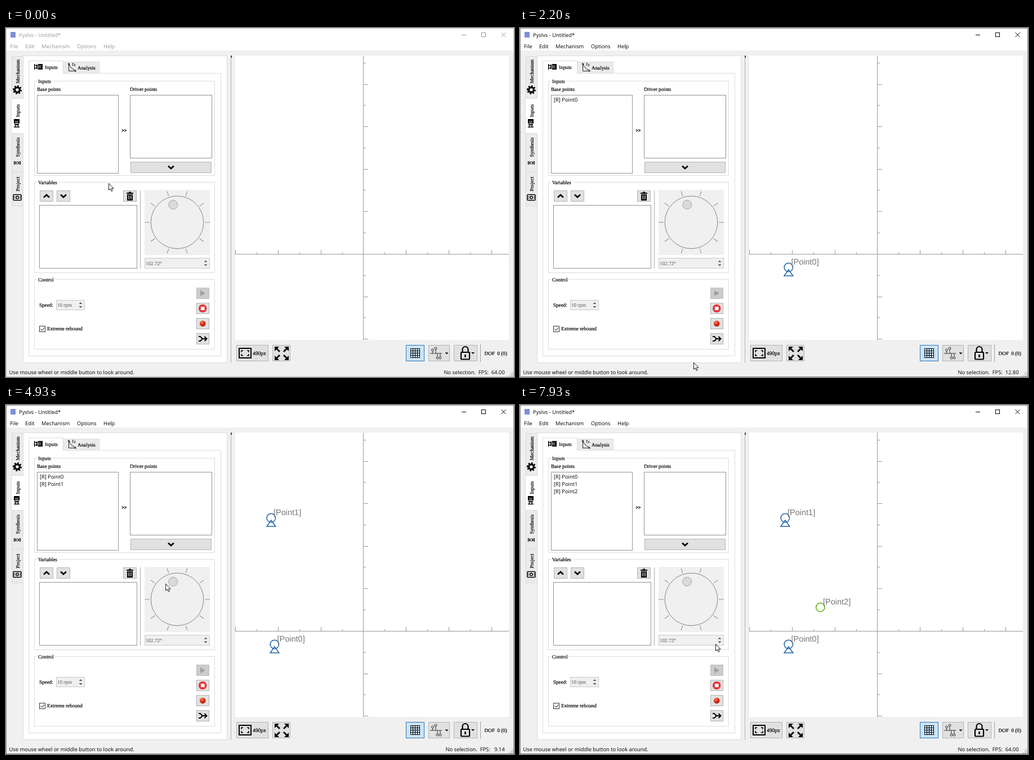
Write an HTML page that moves like this. It is 902 px wide and 621 px high and loops after 8 s.

```html
<!DOCTYPE html>
<html lang="en">
<head>
<meta charset="utf-8">
<title>Mechanism editor</title>
<style>
  html, body { margin: 0; width: 100%; height: 100%; overflow: hidden; background: #f0f0f0; }
  svg { display: block; width: 100vw; height: 100vh; }
  text { font: 9.35px "Open Sans", "Noto Sans", sans-serif; fill: #000; white-space: pre; text-rendering: geometricPrecision; }
  .serif text { font: 9.1px "Liberation Serif", serif; stroke: #000; stroke-width: .2; }
  .label text { font: 14.5px "Liberation Sans", Arial, sans-serif; fill: #777; }
  .dim text { fill: #777; stroke: #777; }
  .crisp { shape-rendering: crispEdges; }
  .pane { fill: #fff; stroke: #dcdcdc; }
  .tab { fill: #ebebeb; stroke: #d9d9d9; }
  .list { fill: #fff; stroke: #8f949b; }
  .button { fill: #e1e1e1; stroke: #b4b4b4; }
  .spin { fill: #f0f0f0; stroke: #c8c8c8; }
  .line { fill: none; stroke: #000; }
  .bold { fill: none; stroke: #111; stroke-width: 3; }
  .axis { fill: none; stroke: #999; }

  /* One loop is 8 s, so 1% is 80 ms. */
  .chrome, .border, .tip, .menu, .hover, .p0, .p1, .p2 { animation: 8s step-end infinite; }
  .chrome { animation-name: activate; color: #999; }
  .chrome text { fill: currentColor; }
  .border { animation-name: frame; fill: none; stroke: #c4c4c4; }
  .tip { animation-name: tip; }
  .menu { animation-name: menu; }
  .menu text { font-size: 9.5px; }
  .hover { animation-name: hover; fill: #91c9f7; }
  .p0 { animation-name: add0; }
  .p1 { animation-name: add1; }
  .p2 { animation-name: add2; }
  .cursor { animation: move 8s linear infinite; }

  @keyframes activate { 0% { color: #999 } 15.8%, 100% { color: #000 } }
  @keyframes frame { 0% { stroke: #c4c4c4 } 15.8%, 100% { stroke: #8a8a8a } }
  @keyframes add0 { 0% { visibility: hidden } 26.6%, 100% { visibility: visible } }
  @keyframes add1 { 0% { visibility: hidden } 61.6%, 100% { visibility: visible } }
  @keyframes add2 { 0% { visibility: hidden } 96.6%, 100% { visibility: visible } }
  @keyframes tip {
    0%, 26.6%, 61.6%, 96.6%, 100% { opacity: 1 }
    17.5%, 49.1%, 88.3% { opacity: 0 }
  }
  @keyframes menu {
    0%, 100% { opacity: 0; transform: translate(477px, 426px) }
    17.5% { opacity: 1; transform: translate(477px, 426px) }
    26.6% { opacity: 0; transform: translate(477px, 426px) }
    49.1% { opacity: 1; transform: translate(470px, 201px) }
    61.6% { opacity: 0; transform: translate(470px, 201px) }
    88.3% { opacity: 1; transform: translate(533px, 360px) }
    96.6% { opacity: 0; transform: translate(533px, 360px) }
  }
  @keyframes hover {
    0%, 26.6%, 61.6%, 96.6%, 100% { opacity: 0; transform: none }
    20%, 51.6%, 90.8% { opacity: 1; transform: none }
    21.6%, 55% { opacity: 1; transform: translateY(15px) }
  }
  @keyframes move {
    0%, .6% { transform: translate(182px, 276px) }
    3.1% { transform: translate(199px, 420px) }
    5.8%, 8% { transform: translate(224px, 565px) }
    10.9%, 15.8% { transform: translate(254px, 567px) }
    19.1% { transform: translate(262px, 569px) }
    23.4%, 26% { transform: translate(306px, 595px) }
    27.5% { transform: translate(308px, 595px) }
    29.1% { transform: translate(306px, 580px) }
    32.5% { transform: translate(285px, 470px) }
    36.6% { transform: translate(245px, 330px) }
    39.1% { transform: translate(236px, 300px) }
    42.5% { transform: translate(243px, 288px) }
    45%, 49.1% { transform: translate(247px, 286px) }
    52.5% { transform: translate(255px, 292px) }
    58.4%, 61.6% { transform: translate(283px, 317px) }
    65% { transform: translate(300px, 380px) }
    68.7% { transform: translate(332px, 465px) }
    70.9%, 78% { transform: translate(339px, 485px) }
    78.3%, 79.5% { transform: translate(338px, 484px) }
    81.6%, 83.1% { transform: translate(335px, 484px) }
    86.6%, 88.3% { transform: translate(325px, 485px) }
    93.4%, 96.5% { transform: translate(342px, 493px) }
    97.5% { transform: translate(343px, 480px) }
    99.1%, 100% { transform: translate(347px, 425px) }
  }
</style>
</head>
<body>
<svg viewBox="0 0 902 621">
  <defs>
    <path id="down" class="bold" d="M-5-2.5 0 2 5-2.5"/>
    <g id="steps" fill="#555"><path d="M-3-2 0-5 3-2ZM-3 2 0 5 3 2Z"/></g>
    <g id="motor">
      <path d="M0 1H1.5V11H0ZM1 3H4V4.3H1ZM1 7.7H4V9H1ZM4 2H6V10H4ZM7 1H15V11H7Z"/>
      <path d="M6 6H8M9 3V9M11 3V9" stroke="#fff" stroke-width=".7"/>
    </g>
    <g id="joint" fill="none" stroke="#1d61a3" stroke-width="1.5">
      <circle r="7.7"/>
      <path d="M0 4-7.7 15H8Z"/>
    </g>
    <radialGradient id="record" cx=".35" cy=".3" r=".8">
      <stop stop-color="#ff8a60"/>
      <stop offset=".4" stop-color="#e63a1c"/>
      <stop offset="1" stop-color="#a81205"/>
    </radialGradient>
  </defs>

  <rect width="902" height="621" fill="#f0f0f0"/>
  <rect width="902" height="40" fill="#fff"/>

  <!-- Title and menu bar -->
  <rect x="8" y="7" width="9" height="10" fill="#7d8fd6"/>
  <g class="chrome">
    <text x="23" y="15.5">Pyslvs - Untitled*</text>
    <text x="7" y="35.5">File</text>
    <text x="34" y="35.5">Edit</text>
    <text x="63" y="35.5">Mechanism</text>
    <text x="126" y="35.5">Options</text>
    <text x="173" y="35.5">Help</text>
    <path d="M809 12.5H817M844.5 8.5H851.5V15.5H844.5Z" fill="none" stroke="currentColor" class="crisp"/>
    <path d="M879.5 8 887.5 16M887.5 8 879.5 16" stroke="currentColor"/>
  </g>

  <!-- Side tabs -->
  <g class="crisp">
    <path class="tab" d="M10.5 50.5H30.5V125.5H10.5ZM10.5 187.5H30.5V256.5H10.5ZM10.5 256.5H30.5V316.5H10.5Z"/>
    <rect class="pane" x="30.5" y="49.5" width="362" height="546"/>
    <path class="pane" d="M31 125.5H9.5V187.5H31"/>
  </g>
  <g class="serif">
    <text transform="translate(24 98.5) rotate(-90)">Mechanism</text>
    <text transform="translate(24 158.5) rotate(-90)">Inputs</text>
    <text transform="translate(24 229.5) rotate(-90)">Synthesis</text>
    <text transform="translate(24 290.5) rotate(-90)">Project</text>
  </g>
  <g fill="none" stroke="#000">
    <circle cx="20" cy="110" r="6.7" stroke-width="2.6" pathLength="80" stroke-dasharray="5 5"/>
    <circle cx="20" cy="110" r="4.4" stroke-width="3.2"/>
    <path d="M14.5 237V243L20 237.5 25.5 243V237L20 242.5ZM17 237.5V242.5M23 237.5V242.5"/>
    <rect x="13" y="296.5" width="14" height="10" rx="1" stroke-width="1.5"/>
    <circle cx="20" cy="301.5" r="2.3" stroke-width="1.5"/>
    <path d="M15 299V304M25 299V304" stroke-width=".8"/>
  </g>
  <use href="#motor" transform="translate(13 177) rotate(-90)"/>

  <!-- Inner tabs -->
  <g class="crisp">
    <rect class="tab" x="101.5" y="60.5" width="64" height="20"/>
    <rect class="pane" x="40.5" y="80.5" width="341" height="503"/>
    <path class="pane" d="M40.5 81V58.5H101.5V81"/>
    <path class="pane" d="M50.5 94.5H370.5V262.5H50.5ZM50.5 274.5H370.5V435.5H50.5ZM50.5 447.5H370.5V571.5H50.5Z"/>
    <path fill="#fff" d="M55 90H82V100H55ZM55 270H93V280H55ZM55 442H87V452H55Z"/>
  </g>
  <use href="#motor" x="50" y="63"/>
  <path class="line" d="M111.5 62V76.5H125M109.5 64H113.5M123 74V78M112 64Q114 72 123 75" stroke-width=".9"/>
  <text x="117" y="68" style="font-size:8px">fx</text>
  <g class="serif">
    <text x="69" y="73">Inputs</text>
    <text x="127" y="73.5">Analysis</text>
    <text x="57" y="97.5">Inputs</text>
    <text x="55" y="112">Base points</text>
    <text x="220" y="112">Driver points</text>
    <text x="57" y="277.5">Variables</text>
    <text x="57" y="450.5">Control</text>
    <text x="205.5" y="185" style="font-size:8px;stroke-width:.5">&gt;&gt;</text>
    <text x="59" y="495.5">Speed:</text>
    <text x="73" y="538">Extreme rebound</text>
  </g>

  <!-- Lists and buttons -->
  <g class="crisp">
    <path class="list" d="M55.5 119.5H199.5V258.5H55.5ZM220.5 119.5H365.5V231.5H220.5ZM59.5 315.5H232.5V427.5H59.5Z"/>
    <path class="button" d="M221.5 238.5H364.5V257.5H221.5ZM60.5 289.5H83.5V308.5H60.5ZM90.5 289.5H113.5V308.5H90.5ZM208.5 289.5H231.5V308.5H208.5Z"/>
    <path class="button" d="M338.5 489.5H360.5V508.5H338.5ZM338.5 516.5H360.5V535.5H338.5ZM338.5 543.5H360.5V562.5H338.5Z"/>
    <rect x="338.5" y="462.5" width="22" height="19" fill="#ccc" stroke="#bfbfbf"/>
    <path class="spin" d="M246.5 409.5H361.5V427.5H246.5ZM89.5 484.5H139.5V501.5H89.5Z"/>
    <path d="M238.5 289V428" stroke="#a8a8a8"/>
    <rect class="list" x="59.5" y="530.5" width="10" height="10" style="stroke:#333"/>
  </g>
  <use href="#down" x="293" y="248"/>
  <use href="#down" x="102" y="299"/>
  <use href="#down" transform="translate(72 299) scale(1 -1)"/>
  <path d="M214 293H218V291.5H222V293H226V295H214ZM215 296H225V307H215Z"/>
  <path d="M217.5 297.5V305M220 297.5V305M222.5 297.5V305" stroke="#ddd"/>
  <path d="M345 467 354 472 345 477Z" fill="#a0a0a0"/>
  <circle cx="349.2" cy="499" r="7.3" fill="#e5393f"/>
  <rect x="346" y="496" width="6.5" height="6" fill="#fff"/>
  <circle cx="349.2" cy="526" r="5.3" fill="url(#record)"/>
  <path class="line" d="M342 549H345L349 553 345 557H342M347 553H356M352.5 549 356.5 553 352.5 557" stroke-width="1.9"/>
  <path class="line" d="M61.5 535.5 64 538 68 533"/>
  <use href="#steps" x="354.5" y="418.5"/>
  <use href="#steps" x="132.5" y="493"/>
  <g class="serif dim">
    <text x="248" y="421.5">102.72°</text>
    <text x="91" y="496">10 rpm</text>
  </g>

  <!-- Dial -->
  <rect x="246" y="288" width="116" height="116" fill="#f0f0f0"/>
  <g fill="none" stroke="#777">
    <circle cx="304" cy="345.8" r="46.8" stroke-width=".9"/>
    <circle cx="304" cy="345.8" r="53.5" stroke-width="9" pathLength="360" stroke-dasharray=".9 35.1" stroke-dashoffset=".45"/>
  </g>
  <circle cx="296.7" cy="314.3" r="8" fill="#dadada" stroke="#a4a4a4"/>

  <!-- Canvas -->
  <g class="crisp">
    <path d="M399.5 49V596" stroke="#b4b4b4"/>
    <path d="M399.5 49V53" stroke="#444" stroke-width="2"/>
    <rect x="407" y="49" width="486" height="506" fill="#fff"/>
    <g class="axis">
      <path d="M407 402.5H893M634.5 49V555"/>
      <path d="M407 398.5H893" stroke-width="7" stroke-dasharray="1 74.8"/>
      <path d="M445 400.5H893" stroke-width="3" stroke-dasharray="1 74.8"/>
      <path d="M639 99.5V555" stroke-width="8" stroke-dasharray="1 74.6"/>
      <path d="M637 61.5V555" stroke-width="4" stroke-dasharray="1 74.6"/>
    </g>
  </g>
  <g class="label">
    <g class="p0"><use href="#joint" x="476.8" y="426"/><text x="481.5" y="421">[Point0]</text></g>
    <g class="p1"><use href="#joint" x="470.8" y="201"/><text x="475" y="196">[Point1]</text></g>
    <g class="p2"><circle cx="533.3" cy="360" r="7.7" fill="none" stroke="#5bb012" stroke-width="1.6"/><text x="538" y="355">[Point2]</text></g>
  </g>
  <text class="p0" x="60" y="130.5">[R] Point0</text>
  <text class="p1" x="60" y="143.5">[R] Point1</text>
  <text class="p2" x="60" y="156.5">[R] Point2</text>

  <!-- Canvas toolbar -->
  <g class="crisp">
    <path class="button" d="M409.5 564.5H465.5V592.5H409.5ZM473.5 564.5H504.5V592.5H473.5ZM750.5 564.5H787.5V592.5H750.5ZM795.5 564.5H836.5V592.5H795.5Z"/>
    <rect x="710.5" y="564.5" width="32" height="28" fill="#cce4f7" stroke="#2a76b8"/>
    <path d="M842.5 563V594" stroke="#a0a0a0"/>
    <rect class="line" x="414" y="570" width="21" height="17" stroke-width="2"/>
    <path class="line" d="M718.5 570.5H734.5V586.5H718.5ZM718.5 574.5H734.5M718.5 578.5H734.5M718.5 582.5H734.5M722.5 570.5V586.5M726.5 570.5V586.5M730.5 570.5V586.5" stroke-width="1.4"/>
  </g>
  <path class="line" d="M418 577V574H421M428 574H431V577M431 580V583H428M421 583H418V580" stroke-width="1.5"/>
  <path d="M477 567H485L477 575ZM502 567H494L502 575ZM477 591H485L477 583ZM502 591H494L502 583Z"/>
  <path class="bold" d="M479 569 486 576M500 569 493 576M479 589 486 582M500 589 493 582"/>
  <g fill="none" stroke="#333">
    <path d="M753 579H774M757.5 575V579M763 572V579M766 579V585M771 579V585"/>
    <circle cx="757.5" cy="573" r="2"/><circle cx="763" cy="570" r="2"/>
    <circle cx="766" cy="587" r="2"/><circle cx="771" cy="587" r="2"/>
  </g>
  <path d="M779.5 577.5H785.5L782.5 580.5ZM826 577H832L829 580Z"/>
  <path class="line" d="M810.5 578V572A5 5 0 0 1 820.5 572V578" stroke-width="2.2"/>
  <rect class="line" x="808" y="577" width="15" height="12.5" rx="1" stroke-width="2.2"/>
  <path d="M814.2 581H816.8V586H814.2Z"/>
  <g class="serif">
    <text x="438" y="582" style="font-size:9.5px">490px</text>
    <text x="849.5" y="582">DOF  0 (0)</text>
  </g>

  <!-- Status bar -->
  <text class="tip" x="5.5" y="616">Use mouse wheel or middle button to look around.</text>
  <text id="status" x="885.5" y="616" text-anchor="end"></text>
  <path d="M899 612V614M896 616H898M899 616H901M893 619H895M896 619H898M899 619H901" stroke="#bbb" stroke-width="2"/>

  <!-- Context menu -->
  <g class="menu">
    <path d="M4 35H116V4H117.5V36.5H4Z" opacity=".4"/>
    <rect class="crisp" x=".5" y=".5" width="115" height="34" fill="#f2f2f2" stroke="#c4c4c4"/>
    <rect class="hover" x="3" y="2.5" width="110" height="15"/>
    <text x="23" y="12.5">Add</text>
    <text x="23" y="27.3">Add to [ground]</text>
  </g>

  <rect class="border crisp" x=".5" y=".5" width="901" height="620"/>
  <path class="cursor" d="M.5.5V12.5L3.3 10 5.2 14.5 7.2 13.6 5.3 9.3H9Z" fill="#fff" stroke="#000" stroke-width=".9"/>
</svg>
<script>
  const LOOP = 8000;
  // [start in ms, frames per second]
  const rates = [
    [0, 64], [70, 10.67], [200, 21.33], [330, 64], [460, 9.14],
    [1400, 1], [2128, 12.8], [2330, 64], [2530, 32], [2730, 64],
    [3000, 21.33], [3200, 64], [3590, 9.14], [3928, 1],
    [4928, 9.14], [5070, 64], [5270, 32], [5470, 21.33], [5660, 64],
    [6268, 9.14], [6395, 64], [7064, 1], [7728, 64]
  ];
  const status = document.getElementById("status");

  function draw() {
    const time = performance.now() % LOOP;
    const [, rate] = rates.findLast(([start]) => start <= time);
    const text = "No selection.  FPS: " + rate.toFixed(2).padStart(6);
    if (status.textContent !== text) status.textContent = text;
    requestAnimationFrame(draw);
  }
  draw();
</script>
</body>
</html>
```
